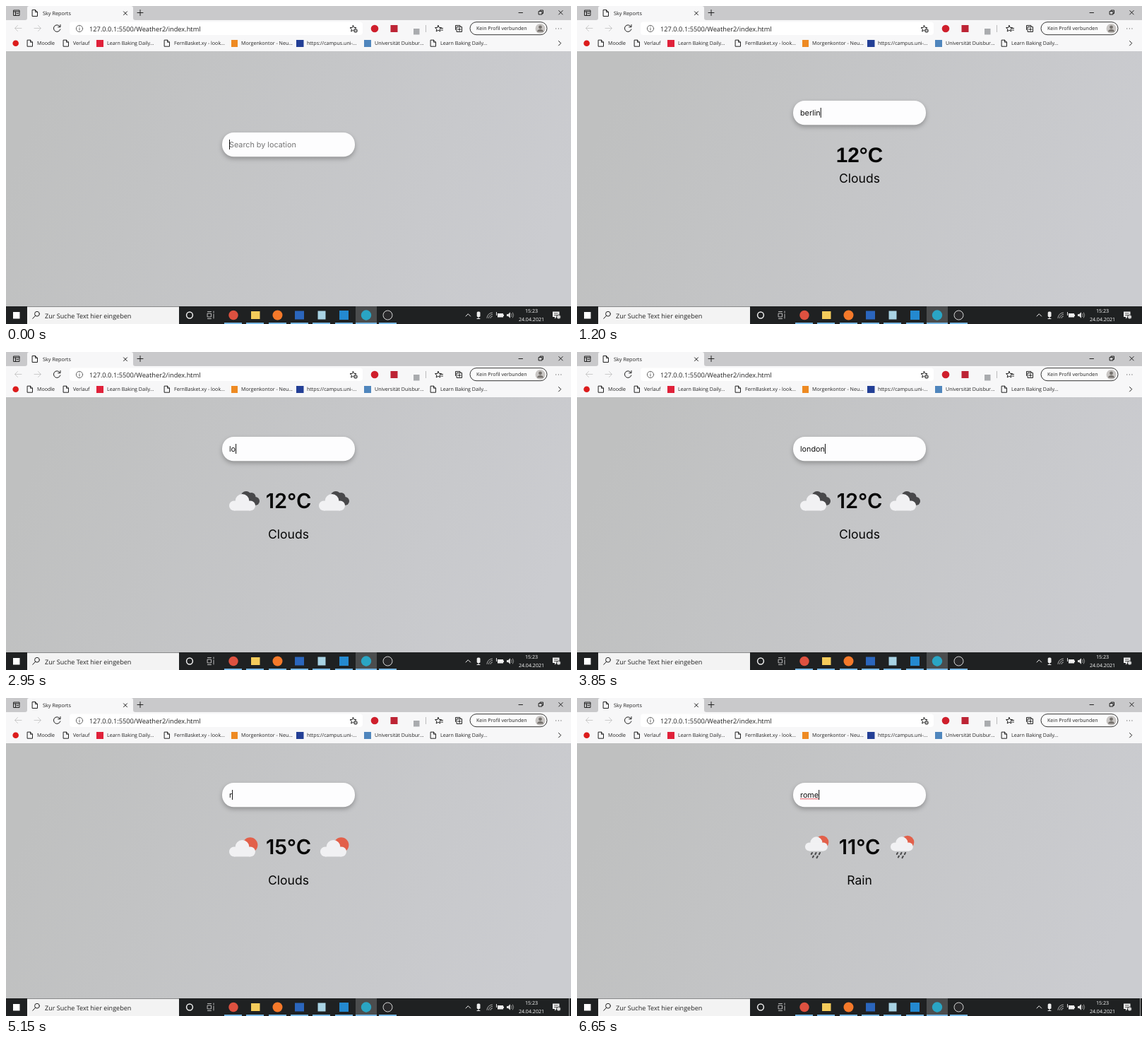
Recreate the animation shown at these times as an HTML page. Size 800x450 px, loop 6.75 s.

```html
<!DOCTYPE html>
<html lang="de">
<head>
<meta charset="utf-8">
<title>Sky Reports</title>
<style>
html, body { margin: 0; width: 100%; height: 100%; overflow: hidden; }
svg { display: block; width: 800px; height: 450px; text-rendering: geometricPrecision; }
text { font: 7.1px "Open Sans", "Noto Sans", sans-serif; fill: #222; }
#search text { font: 10.8px Inter, sans-serif; }
#temp, #sky { text-anchor: middle; fill: #060606; }
#temp { font: 600 29px Inter, sans-serif; }
#temp.fallback { font: bold 29.7px "Liberation Sans", Arial, sans-serif; }
#sky { font: 17.5px Inter, sans-serif; }
.line { fill: none; stroke: #222; stroke-width: 1; stroke-linecap: round; stroke-linejoin: round; }
.light { stroke: #eee; }
</style>
</head>
<body>
<svg viewBox="0 0 800 450">
  <defs>
    <linearGradient id="page" gradientUnits="userSpaceOnUse" x1="60" y1="110" x2="740" y2="400">
      <stop offset="0" stop-color="#bfc0c0"/><stop offset="1" stop-color="#cbccd0"/>
    </linearGradient>
    <path id="doc" class="line" d="M-3.5-4.5h4l3 3v6h-7zM.5-4.5v3h3"/>
    <path id="star" class="line" d="M0-4.5l1.3 2.9 3.2.3-2.4 2.1.7 3.2L0 2.3l-2.8 1.7.7-3.2-2.4-2.1 3.2-.3z"/>
    <g id="cloud" fill="#f1f1f3">
      <circle cx="323" cy="217.5" r="7"/><circle cx="334.5" cy="211" r="10"/>
      <circle cx="346" cy="217.5" r="7"/><path d="M323 212h23v12.5h-23z"/>
    </g>
    <g id="clouds">
      <g fill="#48484a"><circle cx="340" cy="204.5" r="7.5"/><circle cx="347.5" cy="205" r="6"/>
        <circle cx="353" cy="211" r="6"/><path d="M338 206h15v11h-15z"/></g>
      <use href="#cloud"/>
    </g>
    <g id="sun"><circle cx="345.7" cy="208" r="10.7" fill="#e2604a"/><use href="#cloud"/></g>
    <g id="rain">
      <circle cx="347" cy="204" r="9.3" fill="#e2604a"/>
      <use href="#cloud" transform="translate(51.2 23.5) scale(.86)"/>
      <path d="M333 219l-1.2 2M338.5 219l-1.2 2.2M344 219l-1.2 2.2M335 223.5l-1.2 2M340.7 224l-1.2 2.2"
        stroke="#48484a" stroke-width="2" stroke-linecap="round"/>
    </g>
  </defs>

  <!-- tab strip -->
  <path d="M0 0h800v22H0z" fill="#c9c9cb"/>
  <path d="M0 20h27q3 0 3-3V3q0-3 3-3h144q3 0 3 3v14q0 3 3 3h617v44H0z" fill="#f7f7f8"/>
  <path class="line" d="M11 6h8v7.5h-8zM11 8h8M13.5 8v5M15 10.7h2.5"/>
  <use href="#doc" x="41" y="10"/>
  <text x="52" y="12.6" style="font-size:7.3px">Sky Reports</text>
  <path class="line" d="M166.5 7.8l5 5m0-5l-5 5M186 9.5h8M190 5.5v8"/>
  <path class="line" d="M726 9.5h5.5M754.5 7.5h4.5v4.5h-4.5zM756 7.5v-1.5h4.5v4.5h-1.5M782.7 6.5l5.5 5.5m0-5.5l-5.5 5.5" stroke-width=".8"/>

  <!-- toolbar -->
  <path class="line" d="M22 31.5h-9.5m4-4l-4 4 4 4M40 31.5h9.5m-4-4l4 4-4 4" style="stroke:#cbcbcb"/>
  <path class="line" d="M76.6 29.5a4.8 4.8 0 1 0 .3 3.5M77 26.5v3.3h-3.3"/>
  <rect x="90" y="22.5" width="415" height="18.5" rx="4" fill="#fff"/>
  <g class="line" style="stroke:#666"><circle cx="104" cy="32" r="4.6"/><path d="M104 31.5v2.8M104 29.6v.1"/></g>
  <text x="118" y="35.7" style="font-size:9.28px">127.0.0.1:5500/Weather2/index.html</text>
  <use href="#star" x="491.5" y="32"/>
  <circle cx="495" cy="35" r="2.8" fill="#555"/><path d="M493.5 35h3M495 33.5v3" stroke="#fff" stroke-width=".8"/>
  <circle cx="522" cy="32" r="5.3" fill="#cf1f2c"/>
  <path d="M544.5 27h10v10h-10z" fill="#bd2435"/>
  <path d="M577 32h8.5v8.5H577z" fill="#a9abae"/>
  <path d="M594.5 27v10" stroke="#bbb"/>
  <use href="#star" x="612" y="32"/><path class="line" d="M615 31.5h3.5M616 34h2.5"/>
  <path class="line" d="M636.5 33.5v-6h6.5v1M638.5 29.5h7v7h-7zM642 31v4M640 33h4"/>
  <rect x="657" y="22.7" width="109" height="18" rx="9" fill="#fbfbfb" stroke="#333"/>
  <text x="666" y="34.3">Kein Profil verbunden</text>
  <circle cx="756.5" cy="32" r="7" fill="#c9c6c4"/>
  <circle cx="756.5" cy="30" r="2.4" fill="#77736f"/><path d="M752 36.5q0-3.5 4.5-3.5t4.5 3.5z" fill="#77736f"/>
  <path class="line" d="M778.7 32h.1M782.3 32h.1M785.9 32h.1" stroke-width="1.6"/>

  <!-- bookmarks -->
  <circle cx="13.7" cy="52.7" r="4.3" fill="#dc1c1c"/>
  <path d="M128 48h10v10h-10z" fill="#e0213a"/>
  <path d="M319 48h9v10h-9z" fill="#ee8a22"/>
  <path d="M411 48h10.5v10H411z" fill="#233f96"/>
  <path d="M507 48h10v10h-10z" fill="#4f86bd"/>
  <g id="marks"></g>
  <path class="line" d="M782.5 49.5l3.2 3.2-3.2 3.2"/>

  <!-- page -->
  <path d="M0 64h800v361H0z" fill="url(#page)"/>
  <g id="search">
    <rect x="306" width="188" height="34.3" rx="16.5" fill="#fdfdfe" style="filter:drop-shadow(0 3px 3px #0004)"/>
    <text id="query" x="316" y="21"></text>
    <path id="wave" stroke="#e0202c" stroke-width="1.1" stroke-dasharray="1.6 .5"/>
    <path id="caret" d="M0 10v14" stroke="#111"/>
  </g>
  <g id="weather">
    <use id="left"/><use id="right"/>
    <text id="temp" x="400" y="221.3"></text>
    <text id="sky" x="400"></text>
  </g>

  <!-- taskbar -->
  <path d="M0 425h800v25H0z" fill="#1f2122"/>
  <path d="M10 433h9.5v9.5H10z" fill="#fff"/>
  <path d="M30 425.5h215V450H30z" fill="#f3f3f3"/>
  <g class="line"><circle cx="44" cy="435.7" r="3.4"/><path d="M41.5 438.3l-3.7 4"/></g>
  <text x="55" y="441.5" style="font-size:9.07px">Zur Suche Text hier eingeben</text>
  <circle class="line light" cx="260" cy="437.5" r="4.4" style="stroke-width:1.5"/>
  <path class="line" style="stroke:#bbb" d="M285.5 435h5v5h-5zM285.5 432.5h5M285.5 442.5h5M294 432v2M294 436v6"/>
  <path d="M495 425h30v25h-30z" fill="#4b4d4e"/>
  <circle cx="322" cy="437.5" r="6.7" fill="#dd5140"/>
  <path d="M347 432h12.5v11H347z" fill="#f5cc5b"/>
  <circle cx="384.5" cy="437.5" r="7" fill="#f5792a"/>
  <path d="M409 431.5h13v12h-13z" fill="#2b66bd"/>
  <path d="M441.5 431.5h11v12h-11z" fill="#a9d3e4"/>
  <path d="M472 431h13v13h-13z" fill="#2489d0"/>
  <circle cx="510" cy="437.5" r="7.2" fill="#2aa5c4"/>
  <circle cx="540.5" cy="437.5" r="6.5" fill="#29292b" stroke="#d5d5d5"/>
  <path d="M309 449h25M340 449h25M372 449h25M403 449h25M434 449h25M466 449h25M495 449h30M528 449h25" stroke="#7ab9e6" stroke-width="1.8"/>
  <path class="line light" d="M651 439l3.3-3.3 3.3 3.3"/>
  <rect x="666.7" y="432.5" width="4.8" height="7.5" rx="1.5" fill="#eee"/><path class="line light" d="M669 440v2.5M667 442.5h4"/>
  <path class="line" style="stroke:#aaa" d="M681 441.5a7.5 7.5 0 0 1 7.5-7.5M683.5 441.5a5 5 0 0 1 5-5M686 441.5a2.5 2.5 0 0 1 2.5-2.5"/>
  <path d="M696 435h8v5.5h-8z" fill="#eee"/><path class="line light" d="M694.5 433.5v4M704.5 437v1.5"/>
  <path d="M709 436h2l3-2.7v8.4l-3-2.7h-2z" fill="#ddd"/><path class="line" style="stroke:#999" d="M715.7 435.5q1.5 2 0 4M717.5 434q2.5 3.5 0 7"/>
  <g text-anchor="middle"><text x="744" y="434.2" style="fill:#fff">15:23</text><text x="744" y="446" style="fill:#fff">24.04.2021</text></g>
  <path d="M774 432.5h9.5v7.5h-4l-2.5 2.7V440h-3z" fill="#eee"/>
  <path d="M776 435h5.5M776 437.5h5.5" stroke="#333" stroke-width=".8"/>
  <circle cx="782.5" cy="440" r="3" fill="#d9d9d9" stroke="#1f2122" stroke-width=".8"/>
  <path id="edge" d="M797.5 425v25" stroke="#c5c5c5" stroke-width=".8"/>
</svg>
<script>
const LOOP = 6750;
const el = id => document.getElementById(id);
const show = (id, on) => el(id).setAttribute('visibility', on ? 'visible' : 'hidden');
const set = (id, attr, value) => el(id).setAttribute(attr, value);

// x of the label, label, whether a page icon stands before it
const marks = [
  [44, 'Moodle', 1], [95, 'Verlauf', 1], [143, 'Learn Baking Daily...'],
  [238, 'FernBasket.xy - look...', 1], [333, 'Morgenkontor - Neu...'],
  [426, 'https://campus.uni-...'], [522, 'Universität Duisbur...'], [615, 'Learn Baking Daily...', 1]
];
el('marks').innerHTML = marks.map(([x, label, doc]) =>
  `<text x="${x}" y="55.3">${label}</text>` + (doc ? `<use href="#doc" x="${x - 10}" y="52.7"/>` : '')).join('');

// time, query text
const typing = [
  [0, ''], [150, 'b'], [250, 'be'], [400, 'ber'], [550, 'berl'], [750, 'berli'], [850, 'berlin'],
  [1950, 'berli'], [2050, 'berl'], [2150, 'ber'], [2400, 'be'], [2450, 'b'], [2550, ''],
  [2800, 'l'], [2950, 'lo'], [3150, 'lon'], [3300, 'lond'], [3400, 'londo'], [3500, 'london'],
  [4600, 'londo'], [4650, 'lond'], [4700, 'lon'], [4750, 'lo'], [4800, 'l'], [4850, ''],
  [5150, 'r'], [5300, 'ro'], [5450, 'rom'], [5600, 'rome']
];
// time, search box top, temperature, sky, icon
const reports = [
  [0, 179, '', '', ''],
  [1150, 134, '12°C', 'Clouds', ''],
  [1300, 120, '12°C', 'Clouds', 'clouds'],
  [4000, 120, '15°C', 'Clouds', 'sun'],
  [5900, 120, '11°C', 'Rain', 'rain']
];
const gap = { clouds: 127, sun: 129, rain: 121 };
const at = (list, t) => list.filter(entry => entry[0] <= t).pop();

function draw(t) {
  const [typed, text] = at(typing, t);
  const [, top, temp, sky, icon] = at(reports, t);
  const idle = t - typed;

  set('search', 'transform', `translate(0 ${top})`);
  el('query').textContent = text || 'Search by location';
  el('query').style.fill = text ? '#111' : '#757575';
  const end = 316 + (text ? el('query').getComputedTextLength() : 0);
  set('caret', 'transform', `translate(${end + .5} 0)`);
  show('caret', idle % 1000 < 500 && !(t >= 1850 && t < 1900));
  set('wave', 'd', `M316 22.7H${end}`);
  show('wave', text === 'berlin' && idle >= 1000 || text === 'rome' && idle >= 950);

  el('temp').textContent = temp;
  el('temp').classList.toggle('fallback', !icon);
  el('sky').textContent = sky;
  set('sky', 'y', icon ? 264 : 250);
  for (const side of ['left', 'right']) set(side, 'href', icon ? '#' + icon : '');
  set('right', 'x', gap[icon] || 0);
  show('edge', t >= 4250);
}

const start = performance.now();
function tick() {
  draw((performance.now() - start) % LOOP);
  requestAnimationFrame(tick);
}
tick();
</script>
</body>
</html>
```
